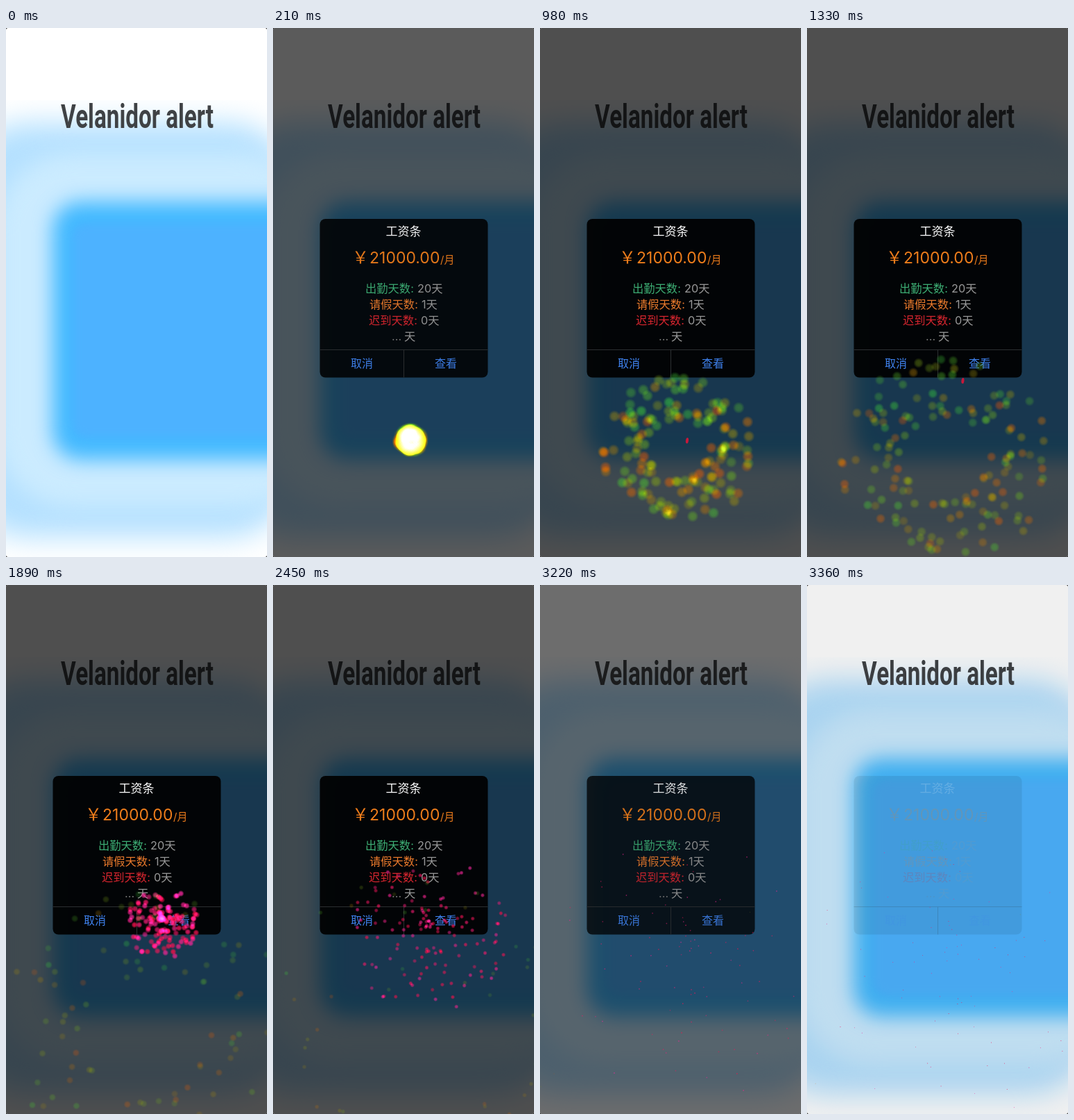
An HTML page with a canvas that plays this animation: 376 by 762 pixels, repeating every 3.43 s.

```html
<!DOCTYPE html>
<html lang="zh">
<head>
<meta charset="utf-8">
<title>Alert with fireworks</title>
<style>
  html, body { margin: 0; width: 100%; height: 100%; overflow: hidden; background: #222; }
  .stage { position: relative; width: 376px; height: 762px; overflow: hidden; background: #fff; border-radius: 3px; }
  .stage > * { position: absolute; left: 0; top: 0; }
  .field { top: 104px; width: 376px; height: 658px; overflow: hidden; }
  .field div { position: absolute; }
  .haze { left: -60px; top: 32px; width: 470px; height: 598px; border-radius: 90px; background: #b5e1ff; filter: blur(20px); }
  .halo { left: -14px; top: 76px; width: 460px; height: 510px; border-radius: 110px; background: #cbebff; filter: blur(16px); }
  .rim { left: 67px; top: 146px; width: 420px; height: 372px; border-radius: 40px; background: #43b9ff; filter: blur(14px); }
  .core { left: 96px; top: 178px; width: 400px; height: 308px; border-radius: 20px; background: #4db2ff; filter: blur(6px); }
  .heading {
    top: 100px; width: 376px; display: flex; justify-content: center;
    font: 700 47.5px/56px Roboto, sans-serif; color: #3f4245; white-space: nowrap;
  }
  .heading span { transform: translateX(1px) scaleX(.7); }
  .shade { width: 376px; height: 762px; background: #000; }
  svg text { font-family: Inter, "Noto Sans CJK SC", "Noto Sans CJK", sans-serif; }
  .row { font-size: 16.3px; }
  .value { fill: #999; }
  .button { font-size: 16px; font-weight: 500; fill: #3f82ee; text-anchor: middle; }
</style>
</head>
<body>
<div class="stage">
  <div class="field">
    <div class="haze"></div><div class="halo"></div><div class="rim"></div><div class="core"></div>
  </div>
  <div class="heading"><span>Velanidor alert</span></div>
  <div class="shade" id="shade"></div>
  <svg width="376" height="762" lang="zh-CN">
    <rect id="panel" x="67.5" y="275" width="242" height="228.5" rx="8" fill="#000" fill-opacity=".92"/>
    <g id="content">
      <path d="M67.5 463.5H309.5M188.5 463.5V503.5" stroke="#2c2f31"/>
      <text x="188" y="299" font-size="17" font-weight="500" fill="#fff" text-anchor="middle">工资条</text>
      <g fill="#ee7d1b">
        <text x="114" y="339" font-size="24">￥</text>
        <text x="139" y="338.5" font-size="23">21000.00</text>
        <text x="241" y="338.5" font-size="15">/月</text>
      </g>
      <g class="row" id="rows"></g>
      <text class="button" x="128" y="489">取消</text>
      <text class="button" x="249" y="489">查看</text>
    </g>
  </svg>
  <canvas id="sky" width="376" height="762"></canvas>
</div>
<script>
const LOOP = 3430, STEP = 70, GRAVITY = 40e-6, FADE = 250, CLOSE = 3155;
const $ = id => document.getElementById(id);
const ctx = $('sky').getContext('2d');

const rows = [
  ['出勤天数:', '20天', 133, 208, '#3dae74'],
  ['请假天数:', '1天', 139, 214, '#ea7a2c'],
  ['迟到天数:', '0天', 138, 213, '#d9262f'],
  ['...', '天', 171, 189, '#777']
];
$('rows').innerHTML = rows.map(([label, value, x, vx, fill], i) => {
  const y = 381.3 + i * 22.8;
  return `<text x="${x}" y="${y}" fill="${fill}">${label}</text><text class="value" x="${vx}" y="${y}">${value}</text>`;
}).join('');

function seeded(seed) {
  return () => {
    seed = (seed * 1664525 + 1013904223) >>> 0;
    return seed / 4294967296;
  };
}

function makeBurst(opts) {
  const rand = seeded(opts.seed);
  const sparks = Array.from({ length: opts.count }, () => ({
    angle: rand() * Math.PI * 2,
    speed: opts.speed * (opts.inner + (1 - opts.inner) * rand()),
    life: opts.life + rand() * 2200,
    color: opts.color(rand()).map(Math.round).join(),
    glow: .7 + .3 * rand()
  }));
  return { ...opts, sparks };
}

const bursts = [
  makeBurst({
    seed: 71, count: 145, start: 80, x: 198, y: 594, speed: .122, inner: .38, life: 1300,
    size: 23.5, shrink: .0069,
    alpha: age => Math.max(.27, .8 - age * .00028),
    color: u => [250 - 195 * u, 85 + 130 * u, 60 * u * u]
  }),
  makeBurst({
    seed: 305, count: 130, start: 1430, x: 226, y: 484, speed: .115, inner: .1, life: 1200,
    size: 11.5, shrink: .005,
    alpha: age => Math.max(.55, 1 - age * .00028),
    color: u => [245, 15 + 25 * u, 70 + 90 * u]
  })
];

const smooth = p => {
  p = Math.min(1, Math.max(0, p));
  return p * p * (3 - 2 * p);
};

function dot(x, y, radius, rgb, alpha) {
  const g = ctx.createRadialGradient(x, y, 0, x, y, radius);
  g.addColorStop(0, `rgba(${rgb},${alpha})`);
  g.addColorStop(.5, `rgba(${rgb},${alpha * .85})`);
  g.addColorStop(1, `rgba(${rgb},0)`);
  ctx.fillStyle = g;
  ctx.fillRect(x - radius, y - radius, radius * 2, radius * 2);
}

function drawBurst(b, t) {
  const age = t - b.start;
  if (age < 0) return;
  const radius = Math.max(.9, (b.size - b.shrink * age) / 2);
  const drop = GRAVITY * age * age / 2;
  const rise = smooth(age / 200);
  for (const s of b.sparks) {
    if (age > s.life) continue;
    const x = b.x + Math.cos(s.angle) * s.speed * age;
    const y = b.y + Math.sin(s.angle) * s.speed * age + drop;
    dot(x, y, radius, s.color, b.alpha(age) * s.glow * rise);
  }
}

function drawRocket(t) {
  const p = (t - 560) / 870;
  if (p < -.05 || p > 1) return;
  ctx.fillStyle = '#c8183a';
  ctx.beginPath();
  ctx.ellipse(197 + 31 * p, 723 - 236 * p * (1.25 - .25 * p), 2, 4.2, .13, 0, Math.PI * 2);
  ctx.fill();
}

function render(t) {
  const shown = smooth(t / FADE) * (1 - smooth((t - CLOSE) / FADE));
  $('shade').style.opacity = shown * .69;
  $('panel').style.opacity = shown;
  $('content').style.opacity = shown ** .7;
  ctx.clearRect(0, 0, 376, 762);
  ctx.globalCompositeOperation = 'lighter';
  drawRocket(t);
  bursts.forEach(b => drawBurst(b, t));
}

const began = performance.now();
function tick() {
  const t = (performance.now() - began) % LOOP;
  render(Math.floor(t / STEP) * STEP);
  requestAnimationFrame(tick);
}
tick();
</script>
</body>
</html>
```
